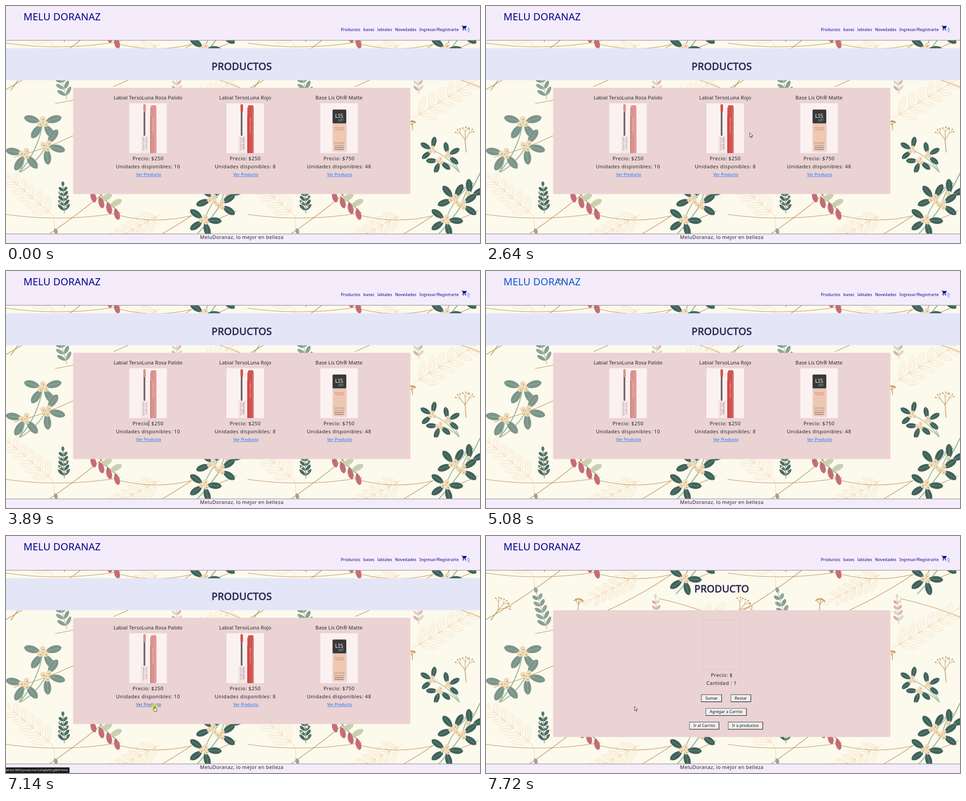
Recreate the animation shown at these times as an HTML page with a canvas. Size 1056 by 530 pixels, loop 8 s.

```html
<!DOCTYPE html>
<html lang="es">
<head>
<meta charset="utf-8">
<title>Productos</title>
<style>
  html, body { margin: 0; width: 100%; height: 100%; overflow: hidden; background: #fcf9ed; }
  canvas { display: block; }
</style>
</head>
<body>
<canvas id="stage" width="1056" height="530"></canvas>
<script>
const W = 1056, H = 530, LOOP = 8000, TILE_W = 538, TILE_H = 383, TILE_Y = 372;
const FONT = '"Noto Sans", "Open Sans", sans-serif';
const NAVY = '#00008b', BLUE = '#0d6efd', HOVER = '#0a58ca', INK = '#212529';
const LILAC = '#f4ebfb', ROSE = '#ebd3d3', PAPER = '#fcf9ed';
const GOLD = '#bb9052', PALE = '#f1d3a6', DARK = '#3f625b', GREY = '#7c958b', STEM = '#9fb99b';
const screen = document.getElementById('stage').getContext('2d');

function makeLayer(w, h) {
  const canvas = document.createElement('canvas');
  canvas.width = w;
  canvas.height = h;
  return canvas.getContext('2d');
}

// ---------- floral wallpaper ----------
const tile = makeLayer(TILE_W, TILE_H);
const rad = deg => deg * Math.PI / 180;

function within(dx, dy, draw) {
  tile.save();
  tile.translate(dx, dy);
  draw();
  tile.restore();
}

// A leaf that grows from (x, y) in the direction of angle a.
function leaf(x, y, a, len, w, fill, stroke) {
  tile.save();
  tile.translate(x, y);
  tile.rotate(a);
  tile.beginPath();
  tile.moveTo(0, 0);
  tile.bezierCurveTo(len * .25, -w, len * .9, -w, len, 0);
  tile.bezierCurveTo(len * .9, w, len * .25, w, 0, 0);
  if (fill) {
    tile.fillStyle = fill;
    tile.fill();
  }
  tile.moveTo(0, 0);
  tile.lineTo(len * .85, 0);
  tile.lineWidth = .7;
  tile.strokeStyle = stroke;
  tile.stroke();
  tile.restore();
}

// A soft curve from one point to another, bowed sideways.
function vine(x0, y0, x1, y1, bow = 0, color = GOLD, width = 1.1) {
  tile.beginPath();
  tile.moveTo(x0, y0);
  tile.quadraticCurveTo((x0 + x1) / 2 - (y1 - y0) * bow, (y0 + y1) / 2 + (x1 - x0) * bow, x1, y1);
  tile.strokeStyle = color;
  tile.lineWidth = width;
  tile.lineCap = 'round';
  tile.stroke();
}

function dot(x, y, r, color) {
  tile.beginPath();
  tile.arc(x, y, r, 0, 7);
  tile.fillStyle = color;
  tile.fill();
}

function berry(x, y, r) {
  dot(x, y, r, '#f1d9b4');
  dot(x + r * .2, y + r * .3, r * .18, '#8d7350');
}

// Paired leaves along a straight stem, shrinking toward the tip.
function branch(x0, y0, x1, y1, n, len, w, stem, fills) {
  const dir = Math.atan2(y1 - y0, x1 - x0);
  vine(x0, y0, x1, y1, 0, stem, 1);
  for (let i = 0; i <= n; i++) {
    const k = (i + .5) / (n + .5), px = x0 + (x1 - x0) * k, py = y0 + (y1 - y0) * k;
    for (const side of i === n ? [0] : [-.75, .75])
      leaf(px, py, dir + side, len * (1 - .4 * k), w,
        fills && fills[(i + (side > 0)) % fills.length], fills ? 'rgba(235,235,220,.4)' : stem);
  }
}

function twig(x, y, a, len, depth) {
  const ex = x + Math.cos(a) * len, ey = y + Math.sin(a) * len;
  vine(x, y, ex, ey, 0, GOLD, .7 + depth * .35);
  if (!depth) return dot(ex, ey, 1.5, GOLD);
  for (const turn of [-.6, .1, .65]) twig(ex, ey, a + turn, len * .62, depth - 1);
}

// n leaves fanned around a direction, with three berries at their root.
function spray(x, y, deg, n, len, color) {
  const r = len * .17;
  for (let i = 0; i < n; i++) {
    const a = rad(deg + (i - (n - 1) / 2) * 70);
    leaf(x + Math.cos(a) * r, y + Math.sin(a) * r, a, len, len * .3, color, 'rgba(225,235,220,.5)');
  }
  for (let i = 0; i < 3; i++) {
    const a = rad(deg + 180 + i * 120);
    berry(x + Math.cos(a) * r * 1.2, y + Math.sin(a) * r * 1.2, r);
  }
}

function mistletoe(x, y, len, color, tips) {
  for (const [tx, ty] of tips) vine(x, y, tx, ty, .15, STEM, len * .06);
  for (const [tx, ty, deg, n] of tips) spray(tx, ty, deg, n, len, color);
}

function paintTile() {
  tile.fillStyle = PAPER;
  tile.fillRect(0, 0, TILE_W, TILE_H);

  // upper part, left and right
  within(0, TILE_H - TILE_Y, () => {
    vine(0, 187, 235, 20, .05);
    vine(240, 180, 413, 86, .05);
    vine(385, 140, 538, 190, -.05);
    vine(110, 218, 190, 200, .03);
    vine(18, 338, 150, 290, .05);
    twig(11, 188, -.95, 28, 2);
    twig(205, 166, -1.5, 13, 2);
    twig(368, 277, -1.7, 10, 2);
    branch(136, 208, 113, 128, 5, 24, 5.5, '#93a596', ['#82998d', '#8da196']);
    branch(382, 196, 378, 140, 4, 17, 4, '#bdb596', ['#dca6a1', '#d8d9c2', '#e0b2ac']);
    mistletoe(28, 374, 37, GREY, [[82, 260, 90, 4], [90, 312, 15, 3], [42, 330, 120, 3]]);
  });
  within(-TILE_W, TILE_H - TILE_Y, () => {
    branch(910, 249, 1050, 164, 6, 43, 8, PALE);
    twig(1025, 327, -1.65, 28, 2);
    mistletoe(1010, 372, 26, DARK, [[950, 322, -150, 3], [984, 334, -30, 3], [966, 346, 110, 3]]);
  });

  // lower part, left and right
  within(0, -TILE_Y, () => {
    vine(0, 466, 255, 462, .08);
    vine(255, 469, 413, 469, .12);
    vine(440, 486, 513, 458, .06);
    branch(104, 468, 8, 384, 5, 39, 8, PALE);
    vine(104, 468, 106, 505, -.15, PALE, 1);
    branch(342, 468, 235, 525, 6, 36, 6, PALE);
    branch(130, 463, 127, 404, 5, 20, 4.5, DARK, [DARK, '#4c6d65']);
    for (let i = 0; i < 4; i++) berry(127 + (i % 2 ? 6 : -6), 417 + i * 11, 2.3);
    vine(190, 390, 246, 455, .12, '#8fa477', 1.8);
    for (let i = 0; i < 2; i++) leaf(209 + i * 22, 436 + i * 12, -.5, 30, 8, '#cdd3b3', '#aeb690');
    for (let i = 0; i < 4; i++) leaf(191 + i * 17.5, 414 + i * 13, 1.3, 26, 7.5, '#c96f77', '#b45963');
  });
  within(-TILE_W, -TILE_Y, () => {
    vine(1056, 374, 962, 512, -.08, STEM, 2.5);
    mistletoe(1040, 396, 33, DARK, [[1034, 425, -60, 2], [998, 432, -130, 3], [1016, 444, 0, 2], [980, 478, 110, 4]]);
  });
}

// ---------- page parts ----------
let ctx, zones = [];

function rect(x, y, w, h, color, radius = 0) {
  ctx.fillStyle = color;
  ctx.beginPath();
  ctx.roundRect(x, y, w, h, radius);
  ctx.fill();
}

function textWidth(text, size, gap = 0, style = '') {
  ctx.font = `${style} ${size}px ${FONT}`;
  ctx.letterSpacing = gap + 'px';
  return ctx.measureText(text).width;
}

// Draws text and, when `hit` is given, remembers its box for the pointer.
function label(text, x, y, size, color, opt = {}) {
  const { left = false, gap = 0, style = '', bold = 0, line = false, hit, back } = opt;
  const w = textWidth(text, size, gap, style), start = left ? x : x - w / 2;
  ctx.fillStyle = color;
  ctx.fillText(text, start, y);
  if (bold) {
    ctx.strokeStyle = color;
    ctx.lineWidth = bold;
    ctx.lineJoin = 'round';
    ctx.strokeText(text, start, y);
  }
  if (line) ctx.fillRect(start, y + 1.2, w, .7);
  if (!hit) return;
  const top = y - size * .98, tall = size * 1.35;
  zones.push({
    kind: hit, l: start, t: top, r: start + w, b: top + tall,
    hover() {
      rect(start - 1, top, w + 2, tall, back);
      label(text, x, y, size, HOVER, { ...opt, hit: null });
    }
  });
}

function upright(text, x, y, size, color, gap = 0) {
  ctx.save();
  ctx.translate(x, y);
  ctx.rotate(Math.PI / 2);
  label(text, 0, 0, size, color, { left: true, gap });
  ctx.restore();
}

const CART = new Path2D('M7 18a2 2 0 1 0 0 4a2 2 0 1 0 0-4zM1 2v2h2l3.6 7.6-1.4 2.4c-.7 1.3.3 3 1.8 3h12v-2H7.4l-.2-.3 1-1.7h7.4c.8 0 1.4-.4 1.8-1l3.5-6.5c.4-.7-.1-1.5-.9-1.5H5.2l-.9-2zM17 18a2 2 0 1 0 0 4a2 2 0 1 0 0-4z');

function pageFrame() {
  for (const x of [0, TILE_W])
    for (const y of [TILE_Y - TILE_H, TILE_Y]) ctx.drawImage(tile.canvas, x, y);
  rect(0, 0, W, 76, LILAC);
  rect(0, 510, W, 20, LILAC);
  for (const y of [76, 509]) rect(0, y, W, 1.3, '#989898');
  label('MELU DORANAZ', 39, 32.3, 22, NAVY, { left: true, gap: .2, hit: 'hand', back: LILAC });
  let x = 746;
  for (const word of ['Productos', 'bases', 'labiales', 'Novedades', 'Ingresar/Registrarte']) {
    label(word, x, 56.3, 8.8, NAVY, { left: true, gap: .18 });
    x += textWidth(word, 8.8, .18) + 6.6;
  }
  ctx.save();
  ctx.translate(1014.5, 42.6);
  ctx.scale(.56, .56);
  ctx.fillStyle = NAVY;
  ctx.fill(CART);
  ctx.restore();
  label('0', 1028, 56.3, 8.8, BLUE, { left: true, gap: .2, line: true });
  label('MeluDoranaz, lo mejor en belleza', 525.3, 521, 11, INK, { gap: .42 });
}

function heading(text, y) {
  label(text, 525.3, y, 22, '#2a2a50', { gap: .35, bold: .9, hit: 'text' });
}

function lipstick(x, color, shade) {
  rect(x + 31.8, 236, 3.8, 55, '#6c6263', 1);
  rect(x + 31.2, 219.5, 5.6, 18, color, 3);
  rect(x + 27, 290, 14.5, 39, '#f4e9e8', 1);
  for (const edge of [27, 40.5]) rect(x + edge, 290, 1, 39, '#dfd3d3');
  upright('TONO MATE', x + 35.5, 293, 4.5, shade, .2);
  upright('LARGA DURACIÓN', x + 30.5, 293, 3.5, '#8d8284');
  rect(x + 48, 222, 12, 22, color, 2);
  rect(x + 46.5, 227, 14, 102, color, 1);
  rect(x + 46.5, 245, 2, 84, shade);
  rect(x + 57.5, 228, 1.3, 101, 'rgba(255,255,255,.25)');
  upright('LABIAL LÍQUIDO', x + 51.5, 249, 4, 'rgba(255,240,235,.75)', .3);
}

function bottle(x) {
  const mid = x + 42;
  rect(x + 26.5, 261, 33, 66.5, '#e8dcd7', 3);
  rect(x + 29, 263, 28, 57, '#efc8b1', 2);
  rect(x + 27.3, 231.5, 30.6, 31, '#3b3839', 2);
  label('LIS', mid, 250, 13, '#f1efef');
  label('oh!', mid + 4, 257.5, 8, '#72bfc0', { style: 'italic' });
  label('MATE SUAVE', mid, 274, 3.6, '#c46e60');
  label('+ SIN BRILLO', mid, 278, 3.2, '#c46e60');
  label('CON TEXTURA', mid, 308, 3.6, '#b85b58');
  ['#9fb3ad', '#b98a78', '#c97d70'].forEach((c, i) => rect(mid - 10.5, 311 + i * 4.5, 21, 2.2, c));
}

function listPage() {
  pageFrame();
  rect(0, 94.5, W, 71.5, '#e4e6f8');
  heading('PRODUCTOS', 143.4);
  rect(149.5, 183, 751.5, 237.5, ROSE, 3);
  const items = [
    [316.5, 'Labial TersoLuna Rosa Palido', 250, 10, x => lipstick(x, '#dc9390', '#c97c7a')],
    [533, 'Labial TersoLuna Rojo', 250, 8, x => lipstick(x, '#d2524d', '#b93c3a')],
    [742, 'Base Lis Oh® Matte', 750, 48, bottle]
  ];
  for (const [x, name, price, stock, picture] of items) {
    rect(x - 41.8, 217.5, 83.6, 111.5, '#fbf1f0');
    picture(x - 41.8);
    label(name, x, 209.3, 11, INK, { gap: .15, hit: 'text' });
    label('Precio: $' + price, x, 345, 11, INK, { gap: .52, hit: 'text' });
    label('Unidades disponibles: ' + stock, x, 362.6, 11, INK, { gap: .58, hit: 'text' });
    label('Ver Producto', x + 1.4, 380.2, 8.8, BLUE, { gap: .17, line: true, hit: 'hand', back: ROSE });
  }
}

function buttonRow(words, y) {
  const widths = words.map(word => textWidth(word, 8.8, .1) + 18.5);
  let x = 535 - (widths.reduce((a, b) => a + b) + 19.5 * (words.length - 1)) / 2;
  words.forEach((word, i) => {
    const w = widths[i];
    rect(x, y, w, 17, '#1d1d1d');
    rect(x, y, w - 1.2, 15.8, '#777');
    rect(x + 1.1, y + 1.1, w - 2.4, 14.6, '#efefef');
    label(word, x + w / 2, y + 11.4, 8.8, '#111', { gap: .1 });
    x += w + 19.5;
  });
}

function detailPage() {
  pageFrame();
  heading('PRODUCTO', 126.4);
  rect(149.5, 166, 751.5, 283.5, ROSE, 3);
  ctx.strokeStyle = '#d9c5c6';
  ctx.lineWidth = 1;
  ctx.strokeRect(483.5, 187.5, 83.5, 111);
  label('Precio: $', 525.2, 314.8, 11, INK, { gap: .5 });
  label('Cantidad : 1', 524.8, 332.6, 11, INK, { gap: .5 });
  [['Sumar', 'Restar'], ['Agregar a Carrito'], ['Ir al Carrito', 'Ir a productos']]
    .forEach((words, i) => buttonRow(words, 354.3 + i * 30.75));
}

function prerender(paint) {
  ctx = makeLayer(W, H);
  zones = [];
  paint();
  return { image: ctx.canvas, zones };
}

paintTile();
const list = prerender(listPage), detail = prerender(detailPage);
ctx = screen;

// ---------- pointer ----------
const ENTER = 660, OPEN = 7250;
// time, x, y at each turn
const PATH = [
  [ENTER, 906, 489], [1080, 581, 412], [1410, 577, 399], [1740, 575, 393], [2100, 560, 358],
  [2640, 588, 284], [3000, 515, 175], [3330, 389, 197], [3890, 318, 341], [4250, 316, 376],
  [5010, 179, 46], [5080, 164, 17], [5400, 160, 20], [5790, 503, 146], [5900, 489, 176],
  [6650, 335, 363], [7070, 331, 381], [LOOP + 1, 331, 381]
];

function pointerAt(t) {
  // the pointer rests here and only jumps between turns
  if (t > 1080 && t < 1740) t -= (t - 1080) % 330;
  const i = PATH.findIndex(p => p[0] > t);
  const [t0, x0, y0] = PATH[i - 1], [t1, x1, y1] = PATH[i];
  const k = (t - t0) / (t1 - t0);
  return [x0 + (x1 - x0) * k, y0 + (y1 - y0) * k];
}

const ARROW = new Path2D('M0 0V9.4L2.2 7.4L3.7 11L5.3 10.3L3.8 6.8H6.8Z');
const HAND = new Path2D('M-1 0.7C-1 -.5 .8 -.5 .8 .7V4L4.3 4.8Q5.3 5.1 5.2 6.2L4.6 9.2V11H-.7V9.8L-3.1 6.7C-3.6 5.8 -2.6 5 -1.8 5.7L-1 6.5Z');

function drawPointer(x, y, kind) {
  ctx.save();
  ctx.translate(x, y);
  if (kind === 'text') {
    rect(-.4, -5, .9, 10, '#333');
    for (const end of [-5.2, 4.4]) rect(-2, end, 4, .8, '#333');
  } else {
    const shape = kind === 'hand' ? HAND : ARROW;
    ctx.lineWidth = .9;
    ctx.fillStyle = '#fff';
    ctx.strokeStyle = '#222';
    ctx.fill(shape);
    ctx.stroke(shape);
  }
  ctx.restore();
}

function statusBar(path, alpha = 1) {
  const text = 'alhost:3000' + path;
  ctx.globalAlpha = alpha;
  rect(0, 517.5, textWidth(text, 6.4) + 3, 12.5, '#161616');
  label(text, -.5, 526, 6.4, '#f2f2f2', { left: true });
  ctx.globalAlpha = 1;
}

function render(t) {
  const page = t < OPEN ? list : detail;
  ctx.drawImage(page.image, 0, 0);
  if (t >= 5430 && t < 5790) statusBar('');
  if (t >= 7070 && t < 7720)
    statusBar('/productos/3ul3aJIaf0UgiBKKYemk', t < 7580 ? 1 : t < 7650 ? .65 : .3);
  if (t < ENTER) return;

  const [x, y] = pointerAt(t);
  const zone = page.zones.find(z => x > z.l && x < z.r && y > z.t && y < z.b);
  if (zone && zone.kind === 'hand') zone.hover();
  if (t >= 7140 && t < OPEN) dotOnScreen(x, y + 1.5, 7, 'rgba(240,222,50,.75)');
  drawPointer(x, y, zone && zone.kind);
}

function dotOnScreen(x, y, r, color) {
  rect(x - r, y - r, r * 2, r * 2, color, r);
}

const start = performance.now();
function tick() {
  render((performance.now() - start) % LOOP);
  requestAnimationFrame(tick);
}
tick();
</script>
</body>
</html>
```
